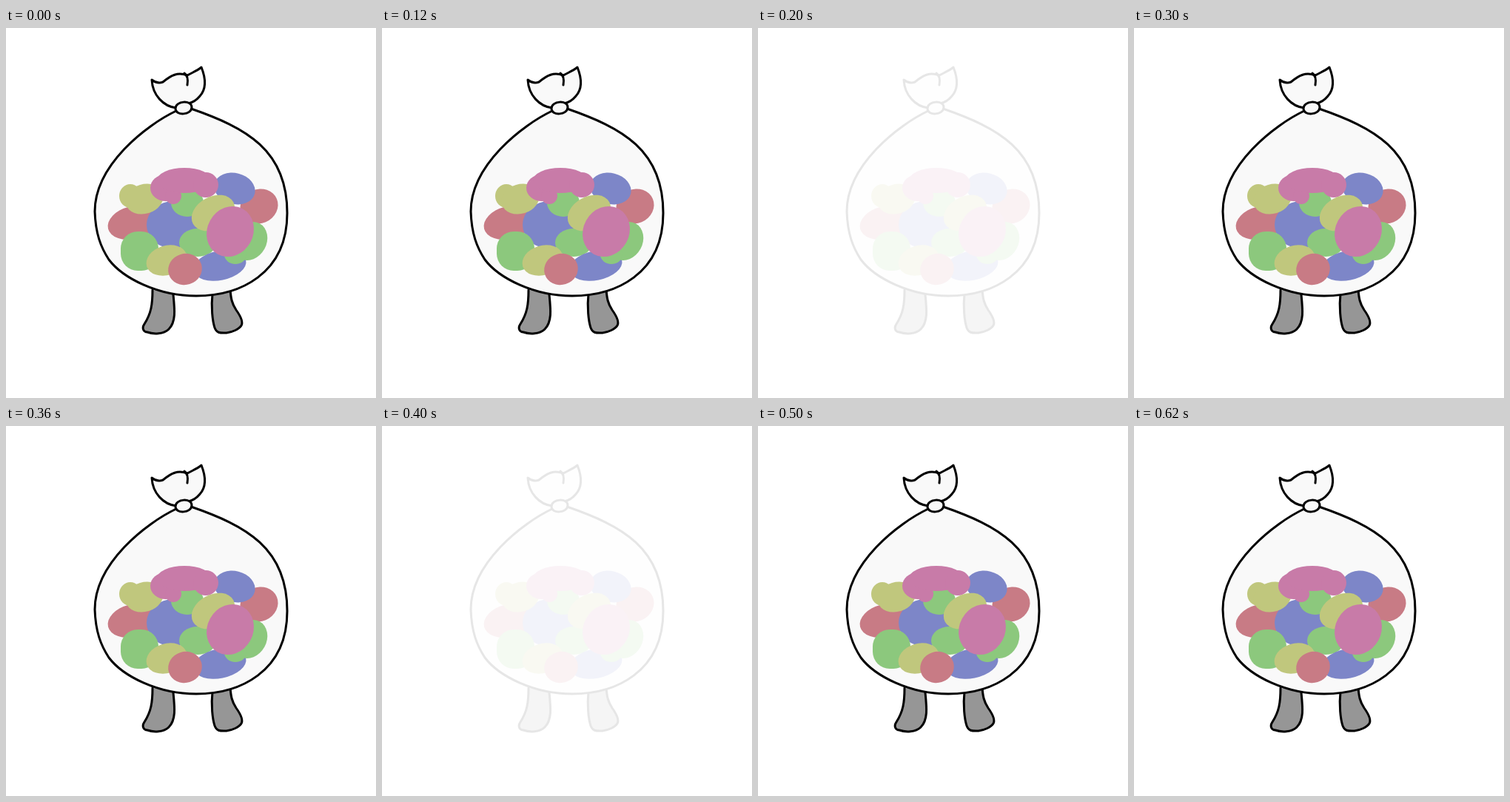
These frames come from a looping animation (500 px wide and 500 px high, 700 ms). An HTML page with a canvas:

```html
<!DOCTYPE html>
<html lang="en">
<head>
<meta charset="utf-8">
<title>Blinking bag</title>
<style>
  html, body { margin: 0; width: 100%; height: 100%; overflow: hidden; background: #fff; }
  canvas { display: block; }
</style>
</head>
<body>
<canvas id="stage" width="500" height="500"></canvas>
<script>
const ctx = document.getElementById("stage").getContext("2d");
const RED = "#c87b85", BLUE = "#7d86c8", GREEN = "#8cc87d", YELLOW = "#c0c77d", PINK = "#c87ba8";
const PLASTIC = "#f9f9f9", GREY = "#969696";
const STEP = 100, LOOP = 7 * STEP;

function oval(color, x, y, rx, ry, tilt = 0) {
  ctx.fillStyle = color;
  ctx.beginPath();
  ctx.ellipse(x, y, rx, ry, tilt, 0, Math.PI * 2);
  ctx.fill();
}

function outline(shape, fill = "transparent") {
  const path = new Path2D(shape);
  ctx.fillStyle = fill;
  ctx.fill(path);
  ctx.stroke(path);
}

function drawLegs() {
  outline("M198 354C198 374 196 386 187 400C183 406 186 411 191 411C199 414 213 414 220 407C230 397 228 380 226 360", GREY);
  outline("M279 359C277 377 279 396 282 405C285 413 290 412 298 412C306 411 315 407 318 402C321 397 316 388 311 381C305 372 304 365 303 354", GREY);
}

function drawBody() {
  outline(`M230 112C190 131 120 185 120 248C121 278 128 296 139 313
    C158 338 205 362 257 362C315 362 380 333 380 250C380 165 325 135 250 109`, PLASTIC);
}

function drawSweets() {
  oval(RED, 171, 263, 34, 22, -0.25);
  oval(BLUE, 226, 266, 36, 32);

  oval(YELLOW, 168, 227, 15, 16);
  oval(YELLOW, 187, 231, 26, 20, -0.3);

  oval(GREEN, 245, 236, 22, 19);
  oval(GREEN, 259, 290, 25, 19);
  oval(RED, 342, 241, 26, 23, -0.4);
  oval(BLUE, 309, 217, 28, 21, 0.25);

  oval(PINK, 216, 216, 21, 18);
  oval(PINK, 226, 227, 11, 11);
  oval(PINK, 241, 206, 37, 17);
  oval(PINK, 270, 212, 17, 17);

  oval(YELLOW, 280, 250, 31, 22, -0.5);
  oval(BLUE, 289, 321, 36, 20, -0.2);

  oval(GREEN, 330, 288, 22, 27, 0.5);
  oval(GREEN, 310, 306, 15, 13);

  oval(PINK, 303, 275, 31, 35, 0.5);

  ctx.fillStyle = GREEN;
  ctx.beginPath();
  ctx.roundRect(155, 275, 51, 53, 23);
  ctx.fill();

  oval(YELLOW, 217, 314, 28, 20, -0.3);
  oval(RED, 242, 326, 23, 21, -0.3);
}

function drawTie() {
  outline(`M230 108C213 106 198 91 197 70C202 74 207 75 212 73C223 64 232 59 245 64
    C252 60 258 58 264 53C270 68 271 82 262 92C257 98 252 101 246 102`, PLASTIC);
  outline("M241 61Q247 65 245 77");
  outline("M229 109C229 98 251 97 251 107C251 118 229 119 229 109Z", PLASTIC);
}

function drawBag() {
  ctx.strokeStyle = "#000";
  ctx.lineWidth = 3;
  ctx.lineCap = ctx.lineJoin = "round";
  drawLegs();
  drawBody();
  drawSweets();
  drawTie();
}

function render(time) {
  const step = Math.floor((time % LOOP) / STEP);
  const faded = step === 2 || step === 4;
  ctx.fillStyle = "#fff";
  ctx.fillRect(0, 0, 500, 500);
  drawBag();
  if (faded) {
    ctx.fillStyle = "rgba(255, 255, 255, 0.9)";
    ctx.fillRect(0, 0, 500, 500);
  }
}

const start = performance.now();
function tick() {
  render(performance.now() - start);
  requestAnimationFrame(tick);
}
tick();
</script>
</body>
</html>
```
